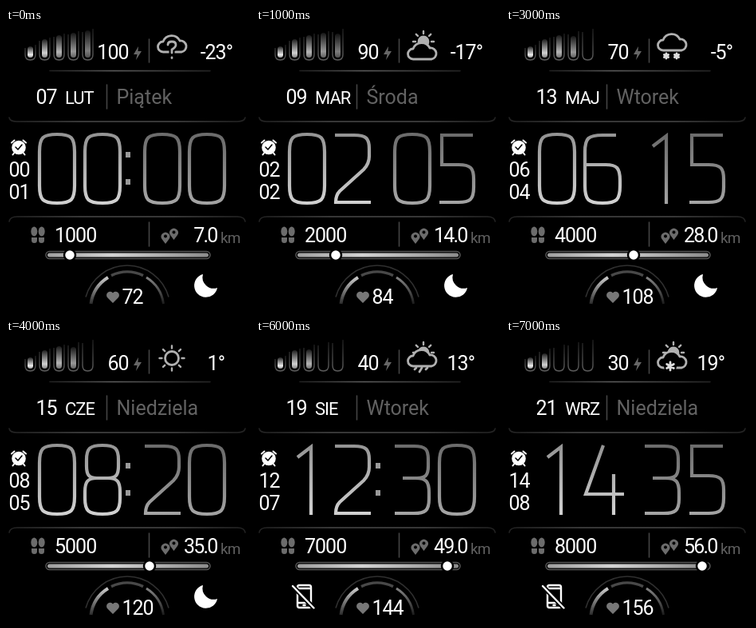
An HTML page for the animation above (8 s loop, 306x354 px).

```html
<!DOCTYPE html>
<html lang="pl">
<head>
<meta charset="utf-8">
<title>Tarcza zegarka</title>
<style>
html, body { margin: 0; width: 100%; height: 100%; overflow: hidden; background: #000; }
svg { display: block; width: 306px; height: 354px; }
text { font: 400 25px Roboto, "Liberation Sans", sans-serif; fill: #fff; letter-spacing: -1px; }
.end { text-anchor: end; }
#day { fill: #626262; letter-spacing: 0; }
#month { font-size: 22px; }
#dist { letter-spacing: -1.8px; }
.unit { font-size: 19px; fill: #606060; }
.line { fill: none; stroke-linecap: round; stroke-linejoin: round; }
#clock { fill: none; stroke-width: 4.2; }
</style>
</head>
<body>
<svg viewBox="0 0 306 354">
  <defs>
    <linearGradient id="hourInk" gradientUnits="userSpaceOnUse" x1="0" y1="0" x2="10" y2="86">
      <stop stop-color="#929292"/><stop offset="1" stop-color="#d0d0d0"/>
    </linearGradient>
    <linearGradient id="minInk" gradientUnits="userSpaceOnUse" x1="0" y1="0" x2="-10" y2="86">
      <stop stop-color="#6c6c6c"/><stop offset="1" stop-color="#a6a6a6"/>
    </linearGradient>
    <linearGradient id="rule" gradientUnits="userSpaceOnUse" x1="4" y1="0" x2="300" y2="0">
      <stop stop-color="#222"/><stop offset=".3" stop-color="#484848"/>
      <stop offset=".7" stop-color="#484848"/><stop offset="1" stop-color="#222"/>
    </linearGradient>
    <linearGradient id="shortRule" gradientUnits="userSpaceOnUse" x1="55" y1="0" x2="256" y2="0">
      <stop stop-color="#222"/><stop offset=".4" stop-color="#5a5a5a"/><stop offset="1" stop-color="#222"/>
    </linearGradient>
    <linearGradient id="barFill" x1="0" y1="0" x2="0" y2="1">
      <stop stop-color="#222"/><stop offset=".75" stop-color="#eee"/><stop offset="1" stop-color="#999"/>
    </linearGradient>
    <linearGradient id="barEdge" x1="0" y1="0" x2="0" y2="1">
      <stop stop-color="#1a1a1a"/><stop offset="1" stop-color="#5c5c5c"/>
    </linearGradient>
    <linearGradient id="track" gradientUnits="userSpaceOnUse" x1="52" y1="0" x2="254" y2="0">
      <stop stop-color="#a0a0a0"/><stop offset=".4" stop-color="#d4d4d4"/><stop offset="1" stop-color="#8c8c8c"/>
    </linearGradient>
    <linearGradient id="arcInk" gradientUnits="userSpaceOnUse" x1="0" y1="347" x2="0" y2="312">
      <stop stop-color="#222"/><stop offset="1" stop-color="#c8c8c8"/>
    </linearGradient>
  </defs>

  <g class="line" stroke="url(#rule)" stroke-width="1.6">
    <path d="M4 112Q5 117 13 117H290Q299 117 300 112"/>
    <path d="M4 242Q5 236 14 236H290Q299 236 300 242"/>
    <path d="M55 53.5L256 53.6" stroke="url(#shortRule)"/>
    <path d="M126.500 71V101M179.500 14V43M179.500 243V273" stroke="#444"/>
  </g>

  <g id="bars"></g>
  <text id="power" class="end" x="153.500" y="38.500"></text>
  <path d="M166 23L160 33H164.500L163 40L170 29H165.500Z" fill="#666"/>
  <g id="sky" class="line" stroke="#b0b0b0" stroke-width="2.800"></g>
  <text id="temp" class="end" y="38.500"></text>

  <text id="date" class="end" x="63.500" y="94.500"></text>
  <text id="month" x="74" y="94.500"></text>
  <text id="day" x="138.500" y="94.500"></text>

  <g class="line" stroke="#fff" stroke-width="2">
    <circle cx="16" cy="149.500" r="7.800" fill="#fff"/>
    <path d="M7 143.500L10.500 140.500M25 143.500L21.500 140.500M10 156.500L8.500 158.500M22 156.500L23.500 158.500"/>
    <path d="M12 149L15 152L20 146" stroke="#000" stroke-width="1.600"/>
  </g>
  <text id="alarmH" class="end" x="29.500" y="186"></text>
  <text id="alarmM" class="end" x="29.500" y="214"></text>

  <g id="clock"></g>
  <path id="colon" d="M150 155h6v7h-6zM150 189h6v7h-6z" fill="#999"/>

  <g fill="#6c6c6c">
    <ellipse cx="35.300" cy="254.500" rx="4" ry="6"/><ellipse cx="44.700" cy="254.500" rx="4" ry="6"/>
    <path d="M32 262h7v3.500a3.500 3.500 0 0 1-7 0zM41 262h7v3.500a3.500 3.500 0 0 1-7 0z"/>
    <path id="pin" fill-rule="evenodd" d="M200 270l-4.500-6a5.400 5.400 0 1 1 9 0zM200 258.500a2 2 0 1 0 .01 0z"/>
    <use href="#pin" x="10.500" y="-5"/>
  </g>
  <text id="steps" x="61" y="268"></text>
  <text id="dist" class="end" x="264.500" y="268"></text>
  <text class="unit" x="269" y="268.500">km</text>

  <rect x="50" y="279.500" width="206" height="9" rx="4.500" fill="#000" stroke="#555" stroke-width="1.500"/>
  <rect x="52" y="281.500" width="202" height="5" rx="2.500" fill="url(#track)"/>
  <circle id="knob" cy="284" r="7" fill="#fff" stroke="#000" stroke-width="2.500"/>

  <g class="line" style="stroke-linecap:butt">
    <path d="M100 336.500A54 54 0 0 1 204 336.500" stroke="#303030" stroke-width="1.600"/>
    <path d="M106.500 345A46 46 0 0 1 128 312" stroke="url(#arcInk)" stroke-width="4"/>
    <path d="M132 309.600A46 46 0 0 1 172 309.600" stroke="#484848" stroke-width="3.500"/>
    <path d="M176 312A46 46 0 0 1 197.500 345" stroke="url(#arcInk)" stroke-width="3" opacity=".65"/>
  </g>
  <path d="M134 344L127 337A4.400 4.400 0 0 1 134 331.500A4.400 4.400 0 0 1 141 337Z" fill="#777"/>
  <text id="pulse" x="145.500" y="344.500"></text>

  <path id="moon" d="M247 308A14.600 14.600 0 1 0 265 325A14 14 0 0 1 247 308Z" fill="#fff"/>
  <g id="mute" class="line" stroke="#fff" stroke-width="2.400">
    <rect x="52" y="308" width="17" height="28" rx="2.500"/>
    <path d="M53 312H68M53 330H68M59.500 333H61.500"/>
    <path d="M46 309L72.500 336.500" stroke="#000" stroke-width="6"/>
    <path d="M46 309L72.500 336.500"/>
  </g>
</svg>

<script>
const $ = id => document.getElementById(id);
const pad = n => String(n).padStart(2, '0');

const months = ['LUT', 'MAR', 'KWI', 'MAJ', 'CZE', 'LIP', 'SIE', 'WRZ'];
const days = ['Piątek', 'Środa', 'Piątek', 'Wtorek', 'Niedziela', 'Piątek', 'Wtorek', 'Niedziela'];

// Thin digits in a 44 x 86 cell
const digits = [
  'M22 0C40 0 44 4 44 22V64C44 82 40 86 22 86C4 86 0 82 0 64V22C0 4 4 0 22 0Z',
  'M10 15L27 2V87',
  'M0 1H24C39 1 43 5 43 18V27Q43 37 36 44L6 71Q1 76 1 85H45',
  'M0 1H24C39 1 42 5 42 18V26C42 38 38 41 28 41H10H26C40 41 43 46 43 59V67C43 82 38 85 24 85H0',
  'M23 0L1 61H49M36 36V87',
  'M42 1H3V38H24C40 38 43 43 43 56V66C43 82 38 85 24 85H0',
  'M39 1H22C4 1 0 5 0 22V64C0 82 4 86 22 86C40 86 44 82 44 64V58C44 42 40 38 26 38H0',
  'M0 1H43L14 87',
  'M22 0C38 0 42 4 42 18V26C42 37 39 41 29 41C41 41 44 46 44 58V66C44 82 40 86 22 86C4 86 0 82 0 66V58C0 46 3 41 15 41C5 41 2 37 2 26V18C2 4 6 0 22 0ZM15 41H29',
  'M5 85H22C40 85 44 81 44 64V22C44 4 40 0 22 0C4 0 0 4 0 22V28C0 44 4 48 18 48H44'
];
const cells = [42, 99, 174, 230];

const cloud = (dy = 0, fill = '#000') =>
  `<path transform="translate(0 ${dy})" fill="${fill}" d="M197 28a6.500 6.500 0 0 1 0-13a11.500 11.500 0 0 1 21-1a7 7 0 0 1 2 14z"/>`;

function sun(x, y, r, fill) {
  let d = '';
  for (let i = 0; i < 8; i++) {
    const c = Math.cos(i * Math.PI / 4), s = Math.sin(i * Math.PI / 4);
    d += `M${x + c * (r + 4)} ${y + s * (r + 4)}L${x + c * (r + 7)} ${y + s * (r + 7)}`;
  }
  return `<circle cx="${x}" cy="${y}" r="${r}" fill="${fill}"/><path d="${d}" stroke-width="2.400"/>`;
}

function flake(x, y, r) {
  let d = '';
  for (let i = 0; i < 3; i++) {
    const c = r * Math.cos(i * Math.PI / 3 + Math.PI / 6), s = r * Math.sin(i * Math.PI / 3 + Math.PI / 6);
    d += `M${x - c} ${y - s}L${x + c} ${y + s}`;
  }
  return `<path d="${d}" stroke="#ddd"/>`;
}

const drops = (y, h) => `<path d="M201 ${y}l-2 ${h}M208 ${y}l-3 ${h + 3}M215 ${y}l-2 ${h}"/>`;
const sunCloud = dy => sun(210, 17, 6, '#b0b0b0') + cloud(dy);

const skies = [
  cloud(2) + `<path d="M202 21Q202 16 208 16Q214 16 214 21Q214 24 208 27V32" stroke="#000" stroke-width="7"/>
    <path d="M203 21Q203 17 208 17Q213 17 213 21Q213 24 208 27V31M208 37v.5"/>`,
  sunCloud(11),
  cloud() + drops(32, 4),
  cloud() + flake(201, 35, 3) + flake(214, 35, 3),
  sun(208, 24, 8.5, 'none'),
  cloud(4, '#888') + cloud(10),
  sunCloud(6) + drops(36, 2),
  sunCloud(8) + '<circle cx="206" cy="34" r="8" fill="#000" stroke="none"/>' + flake(206, 34, 5)
];

function bars(power) {
  const lit = Math.min(5, Math.ceil((power + 1) / 20));
  let out = '';
  for (let i = 0; i < 5; i++) {
    const x = 24 + i * 18, top = [21, 12, 7, 4, 1][i];
    out += `<path d="M${x} ${top + 4}V33Q${x} 40 ${x + 6.5} 40Q${x + 13} 40 ${x + 13} 33V${top}" fill="none" stroke="url(#barEdge)" stroke-width="1.500"/>`;
    if (i < lit) {
      const y = top + (i === lit - 1 && power < 100 ? 6 : 2);
      out += `<rect x="${x + 3}" y="${y}" width="7" height="${37 - y}" rx="3.500" fill="url(#barFill)" opacity="${1 - .12 * i}"/>`;
    }
  }
  return out;
}

// Round half to even
function level(v) {
  const r = Math.round(v);
  return v % 1 === .5 && r % 2 ? r - 1 : r;
}

function show(k) {
  const power = 100 - 10 * k, temp = -23 + 6 * k;
  const hour = pad(2 * k), minute = pad(5 * k);
  const texts = {
    power, temp: temp + '°', date: pad(7 + 2 * k), month: months[k], day: days[k],
    alarmH: hour, alarmM: pad(k + 1), steps: 1000 * (k + 1),
    dist: (7 * (k + 1)).toFixed(1), pulse: 72 + 12 * k
  };
  for (const id in texts) $(id).textContent = texts[id];
  $('temp').setAttribute('x', temp < 0 ? 284 : 274);

  $('bars').innerHTML = bars(power);
  $('sky').innerHTML = skies[k];
  $('clock').innerHTML = [...hour + minute].map((n, i) =>
    `<path transform="translate(${cells[i]} 133)" d="${digits[n]}" stroke="url(#${i < 2 ? 'hourInk' : 'minInk'})"/>`).join('');
  $('colon').style.display = k % 2 ? 'none' : '';
  $('knob').setAttribute('cx', Math.min(246, 60 + 20 * level(1.25 * (k + 1))));

  $('moon').style.display = k < 5 ? '' : 'none';
  $('mute').style.display = k < 5 ? 'none' : '';
}

const start = performance.now();
let shown = -1;
function tick() {
  const k = Math.floor((performance.now() - start) / 1000) % 8;
  if (k !== shown) show(shown = k);
  requestAnimationFrame(tick);
}
tick();
</script>
</body>
</html>
```
